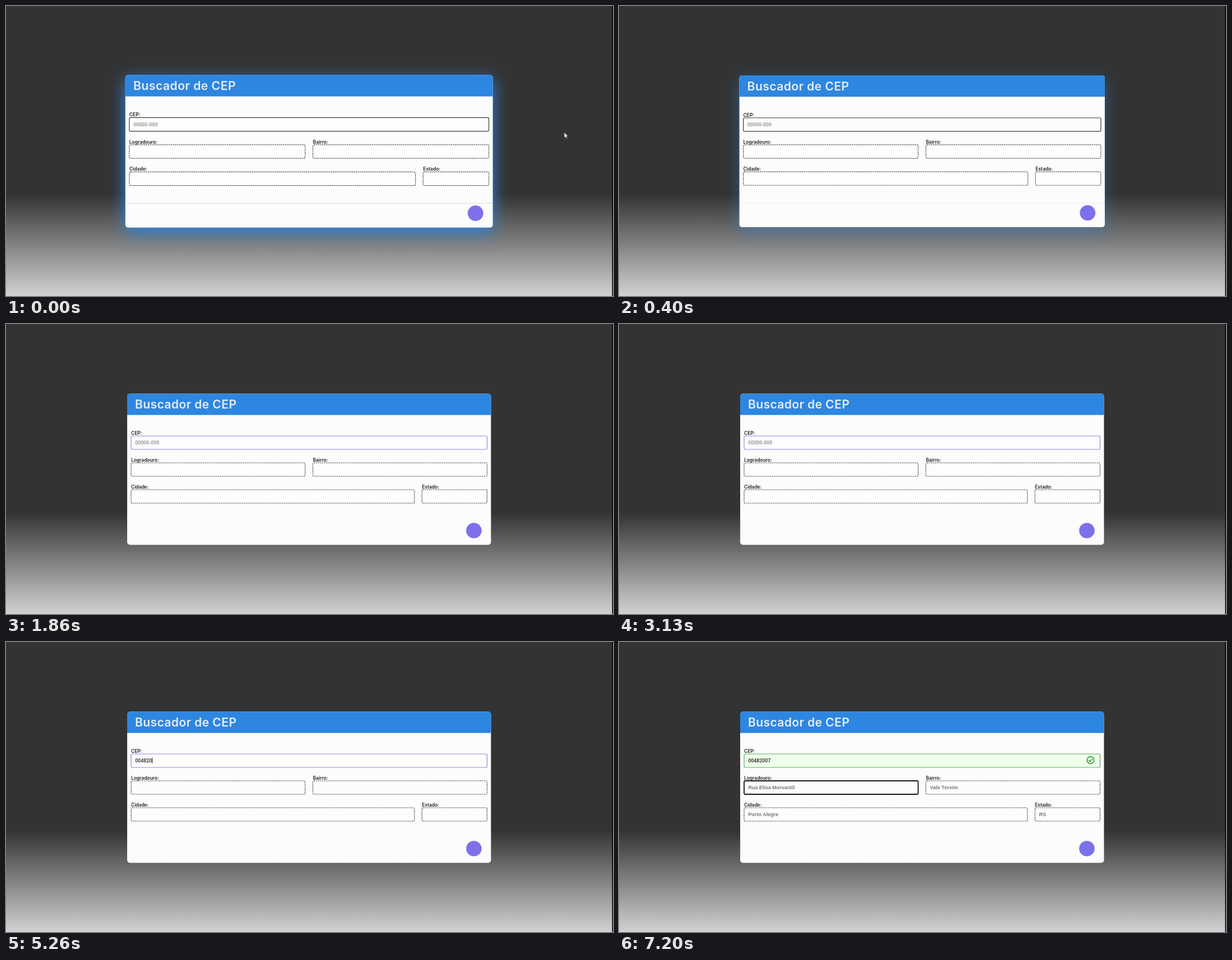
Recreate the animation shown at these times as an HTML page. Size 1082 by 518 pixels, loop 8000 ms.

```html
<!DOCTYPE html>
<html lang="pt-BR">
<head>
<meta charset="utf-8">
<title>Buscador de CEP</title>
<style>
  html, body { margin: 0; width: 100%; height: 100%; overflow: hidden; background: #333; }
  svg { display: block; width: 1082px; height: 518px; }
  .title { font: 600 21px Inter, sans-serif; letter-spacing: .02em; fill: #e7edf5; }
  .label { font: 600 8.4px Inter, sans-serif; fill: #222; }
  .hint { font: 700 8.6px Roboto, sans-serif; fill: #9b9b9b; }
  .typed { font: 500 8.8px Roboto, sans-serif; fill: #222; }
  .result { font: 700 9px "Liberation Sans", Arial, sans-serif; fill: #777; }
  .field { fill: #fdfdfd; stroke: #3a3a3a; }
  .dashed { stroke-dasharray: 2.1 1.3; }
</style>
</head>
<body>
<svg viewBox="0 0 1082 518">
  <defs>
    <linearGradient id="backdrop" x2="0" y2="1">
      <stop offset=".65" stop-color="#333"/>
      <stop offset="1" stop-color="#d2d2d2"/>
    </linearGradient>
    <filter id="blur" x="-15%" y="-30%" width="130%" height="160%">
      <feGaussianBlur stdDeviation="14"/>
    </filter>
  </defs>
  <rect width="1082" height="518" fill="url(#backdrop)"/>
  <rect x="1080.5" width="1.5" height="518" fill="#000"/>
  <g id="card">
    <rect id="glow" x="216" y="132.5" width="648.5" height="270" rx="5" fill="#2d86e0" filter="url(#blur)"/>
    <rect x="216" y="124.5" width="648.5" height="270" rx="5" fill="#fcfcfc"/>
    <path d="M216 162.5V129.5a5 5 0 0 1 5-5H859.5a5 5 0 0 1 5 5V162.5Z" fill="#2d86e0"/>
    <text class="title" x="230" y="151">Buscador de CEP</text>
    <path id="divider" d="M216 351.6H864.5" stroke="#ddd"/>
    <g id="form"></g>
    <circle cx="834" cy="369" r="13.8" fill="#7d70ea"/>
    <rect id="caret" y="206.5" width="1" height="10" fill="#222"/>
    <circle id="spinner" cx="842" cy="211" r="7" fill="none" stroke="#555" stroke-width="1.9" stroke-dasharray="1.7 1.04"/>
    <g id="check" fill="none" stroke="#2ba32f" stroke-width="1.7">
      <circle cx="840.5" cy="211" r="6.3"/>
      <path d="M837.3 211.2l2.3 2.3 4.2-4.5"/>
    </g>
  </g>
  <path id="pointer" d="M0 0V10L2.3 8L4 11.6L5.6 10.9L4 7.4H7Z" fill="#fff" stroke="#333" stroke-width=".8"/>
</svg>
<script>
const LOOP = 8000;
const CODE = '00482007';
const KEY_TIMES = [3730, 4000, 4200, 4460, 4660, 5260, 5400, 5600];
const FOCUS = 1330, SUBMIT = 5660, LOADING = 6130, DONE = 6930, BLINK = 530;
const $ = id => document.getElementById(id);

const fields = [
  { id: 'cep', label: 'CEP:', x: 223, y: 200, w: 634.5 },
  { id: 'street', label: 'Logradouro:', x: 223, y: 248, w: 310.3, result: 'Rua Elisa Morvantil' },
  { id: 'district', label: 'Bairro:', x: 547, y: 248, w: 310.5, result: 'Vale Torvim' },
  { id: 'city', label: 'Cidade:', x: 223, y: 296, w: 505, result: 'Porto Alegre' },
  { id: 'state', label: 'Estado:', x: 741.5, y: 296, w: 116, result: 'RS' }
];

$('form').innerHTML = fields.map(({ id, label, x, y, w, result }) => `
  <text class="label" x="${x}" y="${y - 2}">${label}</text>
  <rect id="${id}" class="field ${result ? 'dashed' : ''}" x="${x}" y="${y}" width="${w}" height="24" rx="2.2" stroke-width="1.2"/>
  ${result ? `<text class="result" x="${x + 7.3}" y="${y + 14.7}">${result}</text>`
           : `<text id="value" x="${x + 7.3}" y="${y + 15}"></text>`}`).join('');
const results = document.querySelectorAll('.result');

const clamp = v => Math.min(1, Math.max(0, v));
const progress = (t, start, length) => clamp((t - start) / length);
const smooth = p => p * p * (3 - 2 * p);
const mix = (a, b, p) => a + (b - a) * p;
const mixColor = (a, b, p) => `rgb(${a.map((v, i) => Math.round(mix(v, b[i], p)))})`;
const show = (el, on) => { el.style.display = on ? '' : 'none'; };

function drawCard(t) {
  const settle = smooth(progress(t, 230, 320));
  const scale = mix(1.01, 1, settle);
  $('card').setAttribute('transform', `translate(540.2 259.4) scale(${scale}) translate(-540.2 -259.4)`);
  $('glow').setAttribute('opacity', 1 - settle);
  $('divider').setAttribute('opacity', 1 - settle);
}

function drawPointer(t) {
  const p = smooth(progress(t, 60, 300));
  $('pointer').setAttribute('transform', `translate(${mix(995, 806, p)} ${mix(225.5, 221, p)})`);
  show($('pointer'), t < 400);
}

function drawInput(t) {
  const keys = KEY_TIMES.filter(time => time <= t);
  const value = $('value');
  value.textContent = CODE.slice(0, keys.length) || '00000-000';
  value.setAttribute('class', keys.length ? 'typed' : 'hint');

  const lastInput = keys.length ? keys[keys.length - 1] : FOCUS;
  const focused = t >= FOCUS && t < SUBMIT;
  show($('caret'), focused && Math.floor((t - lastInput) / BLINK) % 2 === 0);
  $('caret').setAttribute('x', 230.3 + keys.length * 5);

  const done = t >= DONE;
  const focus = focused ? progress(t, FOCUS - 40, 170) : 0;
  $('cep').style.stroke = done ? '#5fae62' : mixColor([58, 58, 58], [154, 134, 230], focus);
  $('cep').style.fill = done ? '#efffec' : '#fdfdfd';
}

function drawLookup(t) {
  const done = t >= DONE;
  const selected = t >= SUBMIT;
  const street = $('street');
  street.classList.toggle('dashed', !selected);
  street.setAttribute('stroke-width', selected ? 1.8 : 1.2);
  street.style.stroke = selected ? '#151515' : '';

  show($('spinner'), t >= LOADING && !done);
  $('spinner').setAttribute('transform', `rotate(${(t - LOADING) * .36} 842 211)`);
  show($('check'), done);
  results.forEach(el => show(el, done));
}

function render(t) {
  drawCard(t);
  drawPointer(t);
  drawInput(t);
  drawLookup(t);
}

const start = performance.now();
function tick() {
  render((performance.now() - start) % LOOP);
  requestAnimationFrame(tick);
}
tick();
</script>
</body>
</html>
```
